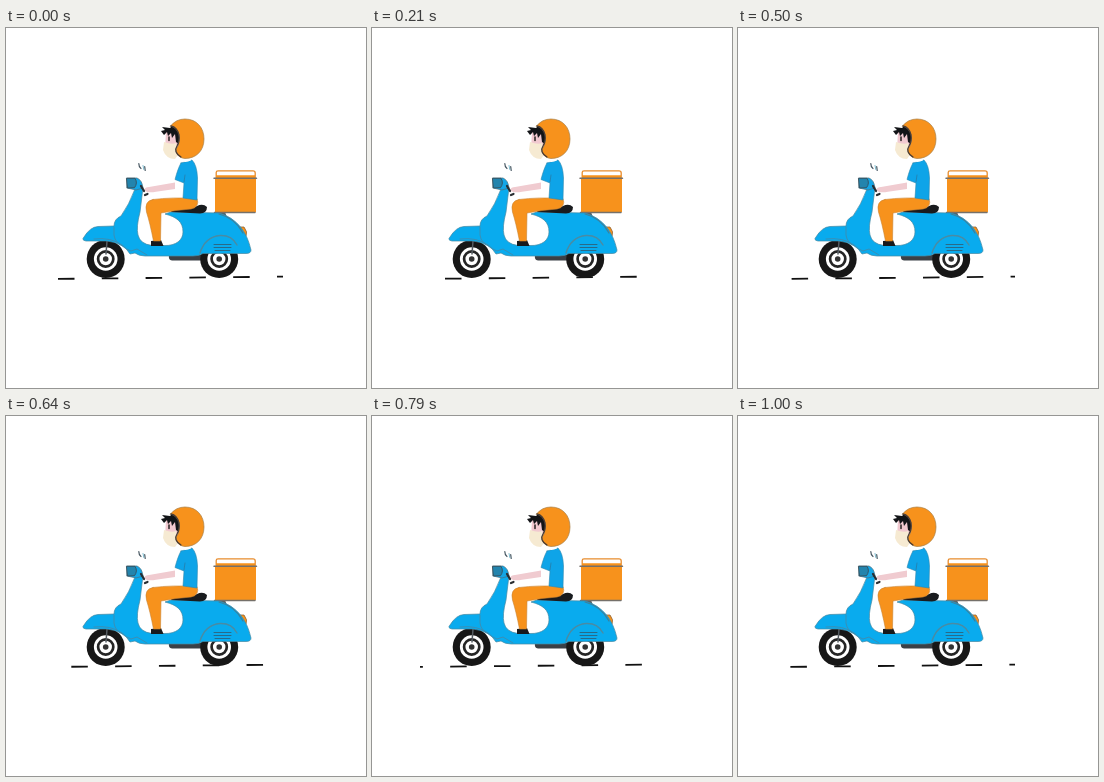
An HTML page for the animation above (1070 ms loop, 360 by 360 pixels).

```html
<!DOCTYPE html>
<html lang="en">
<head>
<meta charset="utf-8">
<title>Scooter delivery</title>
<style>
  html, body { margin: 0; width: 100%; height: 100%; overflow: hidden; background: #fff; }
  svg { display: block; width: 100vw; height: 100vh; }
  .orange { fill: #f7921c; }
</style>
</head>
<body>
<svg viewBox="0 0 360 360" stroke-linecap="round" stroke-linejoin="round">
  <defs>
    <clipPath id="roadClip"><rect x="48" y="240" width="229" height="20"/></clipPath>
    <g id="wheel">
      <circle r="19" fill="#171717"/>
      <circle r="11.8" fill="#fff"/>
      <circle r="7.6" fill="none" stroke="#252525" stroke-width="2.7"/>
      <circle r="2.8" fill="#333"/>
    </g>
  </defs>

  <g id="road" clip-path="url(#roadClip)" stroke="#111" stroke-width="1.8" stroke-linecap="butt"></g>

  <g id="wheels">
    <path d="M163 227H197V232.5H166Q162 232 163 227Z" fill="#3b4046"/>
    <use href="#wheel" x="99.7" y="231"/>
    <use href="#wheel" x="213.2" y="231"/>
    <path d="M101 213L100 226" fill="none" stroke="#555c62" stroke-width="1.5"/>
  </g>

  <g id="cargo">
    <path d="M212 184H219L222 192H215Z" fill="#555d63"/>
    <path d="M210.2 150V144.5Q210.2 142.9 212 142.9H247Q249.2 142.9 249.2 145V150" fill="#fff" stroke="#e88c2c" stroke-width="1.3"/>
    <path class="orange" d="M210 147.2H249V151H210Z"/>
    <path class="orange" d="M209 151H250V184H209Z"/>
    <path d="M208 150.3H250.5M208.5 184.4H249" stroke="#75706a" stroke-width="1.5"/>
  </g>

  <g id="scooter">
    <path class="orange" d="M233 199L238 199Q242 204 240 208L235 208Z" stroke="#8b653d" stroke-width=".8"/>
    <path d="M129 161L137 159.5L134 184Q130 199 132 207Q134 216 146 217.5H158
             C170 218 177 212 177 204C177 194 171 189 159 186L165 184L213 185
             C231 190 241 204 245 222Q245 225.5 240 225.5H197Q193 228 187 228H139
             Q133 228 129 225L124 226Q118 215 101 213L80 213Q75 212 78 209Q84 199 92 198.5L108 198
             Q108 191 115 188Q123 177 129 161Z" fill="#09abee" stroke="#4588a3" stroke-width=".7"/>
    <path d="M88 211Q105 209 116 217Q121 222 125 223L131 221L141 227M108 199L108 207Q109 215 117 218"
          fill="none" stroke="#3a8fb5" stroke-width="1"/>
    <path d="M194 225Q199 209 214 207.5Q226 207 231 217" fill="none" stroke="#4a8ba3" stroke-width="1.4"/>
    <path d="M208 216.5H225M208 219.5H225M209 222.5H224" stroke="#286a89" stroke-width="1"/>
    <path d="M213 186Q229 190 237 205" fill="none" stroke="#3f7f99" stroke-width="1.2"/>
    <path d="M165 184Q165 181.5 173 181.5Q187 181 191 178Q197 175 201 179Q201 185 194 185.5Z" fill="#191b1e"/>
    <path d="M121 150H131Q136 152 137 160L130 162L121 160Z" fill="#13a6e6" stroke="#4d7080" stroke-width=".7"/>
    <path d="M120.8 150.3H129Q132 155 128.5 159.7L122 160Z" fill="#2384ad" stroke="#36505c" stroke-width=".9"/>
    <path d="M132.8 135.5Q132.8 139 135 140.5M138.7 138.5L139.2 142.5" fill="none" stroke="#465661" stroke-width="1.2"/>
    <path d="M137 137.5L137.8 141.5" stroke="#71b5c9" stroke-width=".9"/>
  </g>

  <g id="rider">
    <path d="M145 213L155 212L157.5 218H145Z" fill="#17191c"/>
    <path class="orange" d="M147 171.5Q166 169 191 170.5Q194 179 185 181Q170 182 155 185L154.5 213H147.5
             Q144 195 140.5 184Q138 173 147 171.5Z" stroke="#c98432" stroke-width=".6"/>
    <path d="M169 154.5L169 161L150 163.7Q141 165.5 138 162Q139 159 143 159Z" fill="#f0cbd0"/>
    <path d="M135 158L138 163M139 167L141.5 166" stroke="#292d31" stroke-width="2.2"/>
    <path d="M175 135L186 132Q191 137 191.5 150L191 172L177 170L178 155L169 151.5Q172 140 175 135Z"
          fill="#0ea4e8" stroke="#2d86ad" stroke-width=".6"/>
    <path d="M178 154L179 147" fill="none" stroke="#267da9" stroke-width=".8"/>
    <path d="M167 124L183 128L185 132.5Q178 136 172 131Z" fill="#fff"/>
    <path d="M160 104H173V126L168 130Q160 129 159 121Z" fill="#f1c9d0"/>
    <path d="M158 114Q166 117 170 115L172 127L169 131Q160 131 157 122Z" fill="#f6ead2"/>
    <path d="M155 103L159 102L156 99L164 100L167 97L173 103L173 116L170 114L169 106L166 110L165 105L162 108L161 104L158 107Z" fill="#121417"/>
    <path d="M163 109V112.5" stroke="#252020" stroke-width="1.5"/>
    <path class="orange" d="M164.5 98Q170 91 179 91C191 91 198 100 198 111
             C198 123 190 130.5 179 130.5Q173 130 170.5 125Q169 121 172 118Q176 107 170 101Q167 98 164.5 98Z"
          stroke="#a87f45" stroke-width=".7"/>
    <path d="M165 98Q171 99 173 107Q174 113 171 118Q167 124 175 129" fill="none" stroke="#493c35" stroke-width="1.3"/>
  </g>
</svg>

<script>
  const LOOP = 1070;
  const STEPS = 15;
  const SPACING = 43.8;
  const LENGTH = 16.5;
  // Road travel in px at chosen steps; values between them are linear.
  const TRAVEL = [[0, 0], [3, 21], [5, 31.5], [7, 45.4], [10, 63], [12, 77], [14, 88]];
  const road = document.getElementById("road");

  const dashes = Array.from({ length: 7 }, () => {
    const dash = document.createElementNS("http://www.w3.org/2000/svg", "line");
    road.append(dash);
    return dash;
  });

  function travelAt(step) {
    const next = Math.max(1, TRAVEL.findIndex(([at]) => at >= step));
    const [a, from] = TRAVEL[next - 1];
    const [b, to] = TRAVEL[next];
    return from + (to - from) * (step - a) / (b - a);
  }

  const groundY = x => 250.9 - (x - 52) * 0.01;

  function render(time) {
    // Steps fall on whole 10 ms ticks.
    const t = time % LOOP;
    let step = 0;
    while (step < STEPS - 1 && Math.floor((step + 1) * LOOP / STEPS / 10) * 10 <= t) step++;
    const shift = travelAt(step) % SPACING;
    dashes.forEach((dash, i) => {
      const x = 52 + shift + (i - 1) * SPACING;
      dash.setAttribute("x1", x);
      dash.setAttribute("x2", x + LENGTH);
      dash.setAttribute("y1", groundY(x));
      dash.setAttribute("y2", groundY(x + LENGTH));
    });
  }

  const start = performance.now();
  function tick() {
    render(performance.now() - start);
    requestAnimationFrame(tick);
  }
  render(0);
  requestAnimationFrame(tick);
</script>
</body>
</html>
```
